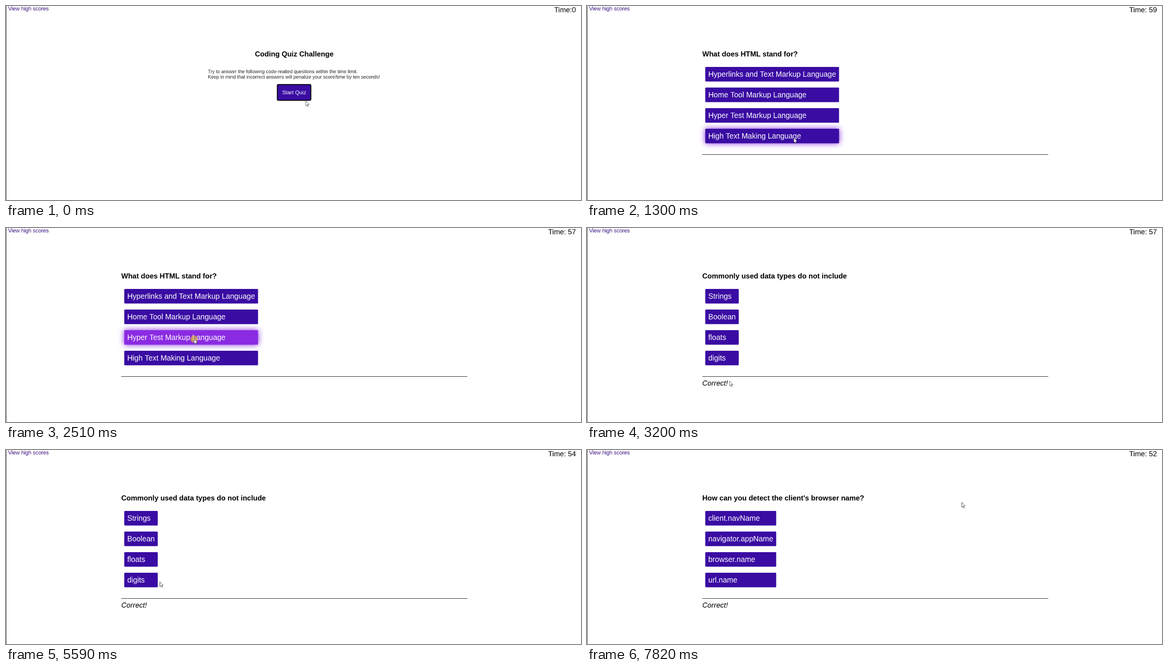
An HTML page with a canvas for the animation above (8000 ms loop, 1280 px wide and 433 px high).

```html
<!DOCTYPE html>
<html lang="en">
<head>
<meta charset="utf-8">
<title>Coding Quiz</title>
<style>
  html, body { margin: 0; width: 100%; height: 100%; overflow: hidden; background: #fff; }
  canvas { display: block; width: 1280px; height: auto; }
</style>
</head>
<body>
<!-- The page is laid out 1920 wide and shown at two thirds. -->
<canvas id="stage" width="1920" height="650"></canvas>
<script>
const ctx = document.getElementById('stage').getContext('2d');
const LOOP = 8000;
const FONT = '"Liberation Sans", Arial, sans-serif';
const INDIGO = '#3a0ca3', VIOLET = '#8a2be2', BLACK = '#000', WHITE = '#fff';
const LEFT = 385, WIDTH = 1155, CENTER = LEFT + WIDTH / 2;

const screens = [
  { from: 400, title: 'What does HTML stand for?',
    options: ['Hyperlinks and Text Markup Language', 'Home Tool Markup Language',
      'Hyper Test Markup Language', 'High Text Making Language'] },
  { from: 2640, title: 'Commonly used data types do not include', correct: true,
    options: ['Strings', 'Boolean', 'floats', 'digits'] },
  { from: 6080, title: "How can you detect the client's browser name?", correct: true,
    options: ['client.navName', 'navigator.appName', 'browser.name', 'url.name'] }
];
const PRESS = 180;

const moves = [
  { start: 0, end: 140, x: 996, y: 304 },
  { start: 430, end: 890, x: 723, y: 495 },
  { start: 890, end: 1300, x: 690, y: 442 },
  { start: 1630, end: 2240, x: 628, y: 372 },
  { start: 2680, end: 3300, x: 464, y: 523 },
  { start: 3300, end: 3900, x: 543, y: 518 },
  { start: 3900, end: 4130, x: 1810, y: 40 },
  { start: 4950, end: 5590, x: 513, y: 441 },
  { start: 5590, end: 5730, x: 483, y: 440 },
  { start: 6140, end: 6570, x: 528, y: 540 },
  { start: 6780, end: 7480, x: 1251, y: 175 }
];

const clamp = k => Math.min(1, Math.max(0, k));
const ease = k => k * k * (3 - 2 * k);

function pointerAt(t) {
  let x = 1000, y = 318;
  for (const m of moves) {
    const k = ease(clamp((t - m.start) / (m.end - m.start)));
    x += (m.x - x) * k;
    y += (m.y - y) * k;
  }
  return { x, y, down: screens.some(s => t >= s.from - PRESS && t < s.from) };
}

function timerAt(t) {
  return t < 900 ? 'Time:0' : `Time: ${59 - Math.floor((t - 400) / 1030)}`;
}

function text(str, x, y, size, color = BLACK, style = '', align = 'left') {
  ctx.font = `${style} ${size}px ${FONT}`;
  ctx.textAlign = align;
  ctx.fillStyle = color;
  ctx.fillText(str, x, y);
}

function button(x, y, w, h, pointer) {
  const over = pointer.x >= x && pointer.x <= x + w && pointer.y >= y && pointer.y <= y + h;
  ctx.save();
  if (over) {
    ctx.shadowColor = VIOLET;
    ctx.shadowBlur = 20;
  }
  ctx.fillStyle = over && pointer.down ? VIOLET : INDIGO;
  ctx.beginPath();
  ctx.roundRect(x, y, w, h, 3);
  ctx.fill();
  ctx.restore();
}

function drawIntro(pointer) {
  text('Coding Quiz Challenge', CENTER, 169, 24, BLACK, 'bold', 'center');
  text('Try to answer the following code-realted questions within the time limit.', 674, 225, 16, '#222');
  text('Keep in mind that incorrect answers will penalize your score/time by ten seconds!', 674, 243, 16, '#222');
  button(905, 262, 114, 55, pointer);
  ctx.strokeStyle = BLACK;
  ctx.lineWidth = 3;
  ctx.beginPath();
  ctx.roundRect(906, 263, 112, 53, 4);
  ctx.stroke();
  text('Start Quiz', CENTER, 296, 18, WHITE, '', 'center');
}

function drawQuestion({ title, options, correct }, pointer) {
  text(title, LEFT, 169, 24, BLACK, 'bold');
  ctx.font = `25px ${FONT}`;
  const w = Math.max(...options.map(o => ctx.measureText(o).width)) + 20;
  options.forEach((label, i) => {
    const y = 204 + i * 69;
    button(LEFT + 10, y, w, 49, pointer);
    text(label, LEFT + 20, y + 33, 25, WHITE);
  });
  ctx.fillStyle = BLACK;
  ctx.fillRect(LEFT, 497, WIDTH, 1);
  if (correct) text('Correct!', LEFT, 528, 24, BLACK, 'italic');
}

function drawPointer({ x, y, down }) {
  if (down) {
    ctx.fillStyle = 'rgba(235, 215, 20, 0.55)';
    ctx.beginPath();
    ctx.arc(x, y, 12, 0, Math.PI * 2);
    ctx.fill();
  }
  ctx.save();
  ctx.translate(x + 0.5, y + 0.5);
  ctx.fillStyle = WHITE;
  ctx.strokeStyle = BLACK;
  ctx.lineWidth = 1;
  const arrow = new Path2D('M0 0V16L4 12.5L6.5 18.5L9 17.5L6.5 11.5H11.5Z');
  ctx.fill(arrow);
  ctx.stroke(arrow);
  ctx.restore();
}

function draw(t) {
  const pointer = pointerAt(t);
  const screen = screens.filter(s => t >= s.from).pop();

  ctx.fillStyle = WHITE;
  ctx.fillRect(0, 0, 1920, 650);
  ctx.fillStyle = BLACK;
  ctx.fillRect(0, 0, 1, 650);
  text('View high scores', 7, 15, 18, '#3c0f7d');
  text(timerAt(t), LEFT + WIDTH + 363, 21, 24, BLACK, '', 'right');
  if (screen) drawQuestion(screen, pointer);
  else drawIntro(pointer);
  drawPointer(pointer);
}

const start = performance.now();
function loop() {
  draw((performance.now() - start) % LOOP);
  requestAnimationFrame(loop);
}
loop();
</script>
</body>
</html>
```
